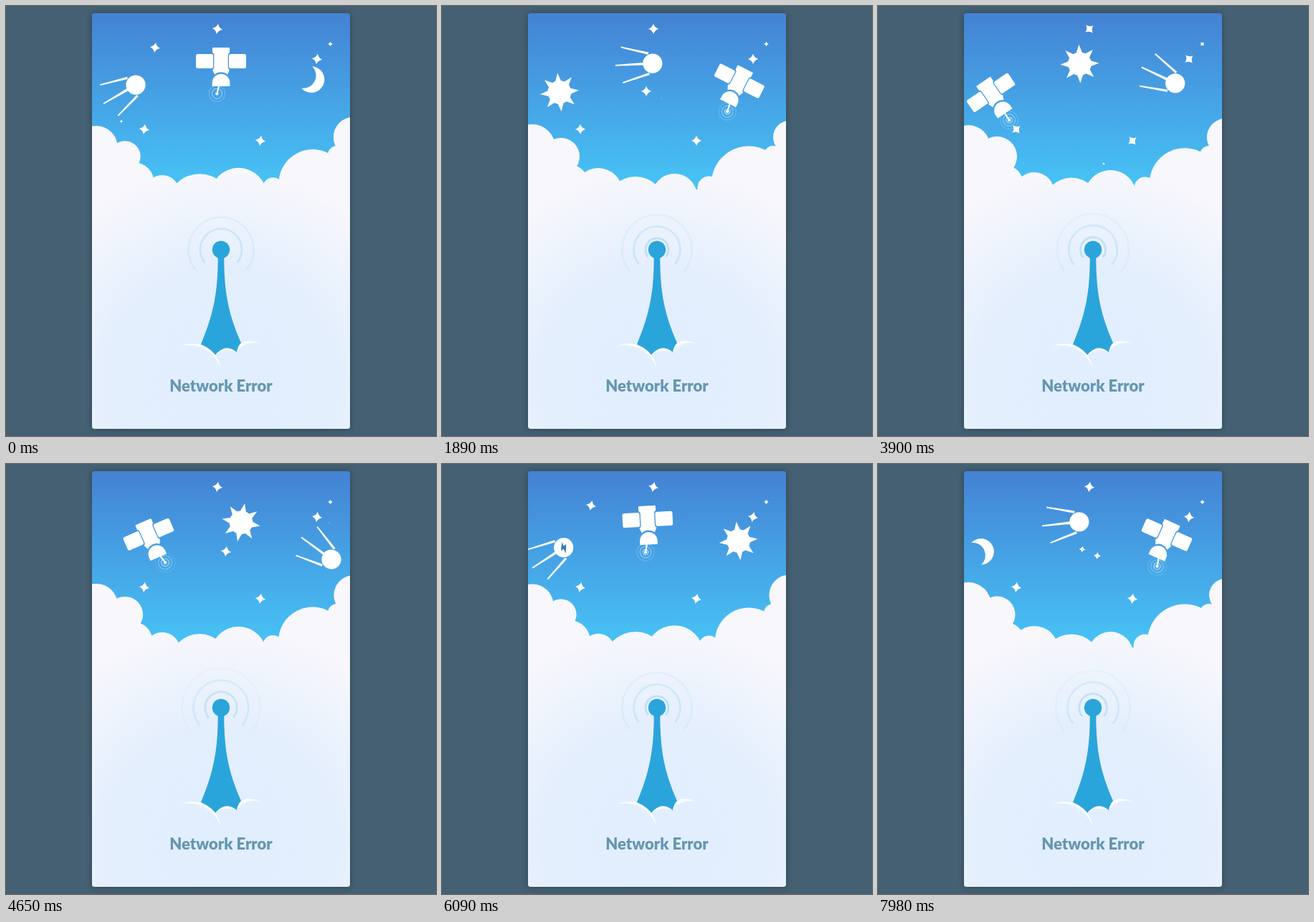
Write an HTML page that moves like this. It is 600x600 px and loops after 8000 ms.

```html
<!DOCTYPE html>
<html lang="en">
<head>
<meta charset="utf-8">
<title>Network Error</title>
<style>
html, body { margin: 0; width: 100%; height: 100%; overflow: hidden; background: #446072; }
svg { display: block; width: 600px; height: 600px; }
.card { filter: drop-shadow(0 0 4px rgba(0, 0, 0, .28)); }
.title { font: 900 22px Lato, "Open Sans", sans-serif; fill: #6596b1; text-anchor: middle; }
.wave { fill: none; }
</style>
</head>
<body>
<svg viewBox="0 0 600 600">
  <defs>
    <linearGradient id="sky" gradientUnits="userSpaceOnUse" x1="0" y1="10" x2="0" y2="250">
      <stop stop-color="#4482d4"/><stop offset="1" stop-color="#47c3f5"/>
    </linearGradient>
    <radialGradient id="mist" gradientUnits="userSpaceOnUse" cx="300" cy="525" r="295">
      <stop stop-color="#e0eefe"/><stop offset=".55" stop-color="#e4effd"/><stop offset="1" stop-color="#f7f7fc"/>
    </radialGradient>
    <clipPath id="frame"><rect x="120" y="10" width="360" height="580" rx="4"/></clipPath>
    <path id="star" d="M0-7.2Q1.7-1.7 7.2 0Q1.7 1.7 0 7.2Q-1.7 1.7-7.2 0Q-1.7-1.7 0-7.2Z"/>

    <g id="satellite">
      <rect x="265" y="67" width="24" height="20" rx="2.5"/>
      <rect x="311" y="67" width="24" height="20" rx="2.5"/>
      <path d="M289 58H311Q312 58 312 59V65Q309.7 66 309.7 69V85Q309.7 88 312 89L309 95.5A14 14 0 0 0 291 95.5L288 89Q290.3 88 290.3 85V69Q290.3 66 288 65V59Q288 58 289 58Z"/>
      <path d="M287.7 112V107A12.3 12.3 0 0 1 312.3 107V112Z"/>
      <g id="antenna">
        <path d="M299 106H301V123H299Z"/><circle cx="300" cy="123" r="2.2"/>
        <g id="pings" stroke="#fff"/>
      </g>
    </g>
    <g id="probe" transform="translate(306.9 80.1)">
      <circle r="13.6"/>
      <path d="M-42.8-25.8L-4.6-15.8L-5.8-12.7L-43.3-24Z"/>
      <path d="M-52.1-.8L-13-1.8V1.8L-52.1 1Z"/>
      <path d="M-42.8 25.8L-4.6 15.8L-5.8 12.7L-43.3 24Z"/>
      <path id="bolt" fill="#2d7cba" d="M2.3-8L-5.5 1.6H-1L-2 8.4L5.5-1.8H1Z"/>
    </g>
    <g id="moon" transform="translate(295.4 70)">
      <path id="crescent" d="M-7-16.9A18.3 18.3 0 1 1-7 16.9A17.8 17.8 0 0 0-7-16.9Z"/>
    </g>
    <g id="sun" transform="translate(300 80)"><g id="rays"><circle r="16.3"/></g></g>
  </defs>

  <g class="card"><rect x="120" y="10" width="360" height="580" rx="4" fill="#4482d4"/></g>
  <g clip-path="url(#frame)">
    <rect x="120" y="10" width="360" height="580" fill="url(#sky)"/>
    <g id="stars" fill="#fff">
      <use href="#star" x="295" y="32"/>
      <use href="#star" x="434" y="74"/>
      <use href="#star" x="193" y="172"/>
      <use href="#star" x="355" y="188"/>
      <use href="#star" transform="translate(452.5 53) scale(.46)"/>
    </g>
    <g id="orbit" fill="#fff"/>
    <g id="clouds" fill="url(#mist)">
      <path d="M120 195L150 200L178 235L218 256H372L430 225L480 190V590H120Z"/>
      <circle cx="126" cy="197" r="29.5" data-swell="2.5"/>
      <circle cx="166" cy="210" r="21.5" data-swell="7" class="late"/>
      <circle cx="178" cy="247" r="29" data-swell="-5" class="late"/>
      <circle cx="218" cy="260" r="23" data-swell="11"/>
      <circle cx="270" cy="278.6" r="44.6" data-swell="-6" class="late"/>
      <circle cx="324.5" cy="265.5" r="40.5" data-swell="-9"/>
      <circle cx="372.5" cy="253.5" r="14" data-swell="2"/>
      <circle cx="428" cy="247.5" r="47" data-swell="5"/>
      <circle cx="462" cy="208" r="13" data-swell="0"/>
      <circle cx="485" cy="183" r="28.7" data-swell="-5.7"/>
    </g>
    <g id="signal" stroke="#2aa5db" stroke-width="2.8"/>
    <g fill="#2aa5db">
      <circle cx="300" cy="340" r="12.2"/>
      <path d="M295.7 350C295.7 400 289.5 430 272 472L285 480L292 487Q300 477 310 478Q318 479 322 484Q323 475 328 470C310.5 430 304.3 400 304.3 350Z"/>
    </g>
    <g fill="#fafcff">
      <path d="M243 475Q262 467 278 475Q297 486 299 504Q291 486 276 478Q260 471 243 475Z"/>
      <path d="M292 487Q307 469 323 484Q307 476 292 487Z"/>
      <path d="M322 484Q326 459 355 471Q332 466 322 484Z"/>
    </g>
    <text class="title" x="300" y="538">Network Error</text>
  </g>
</svg>
<script>
const LOOP = 8000, PACE = 1050;   // one scene second lasts PACE ms
const CYCLE = 6;                  // scene seconds for clouds and sparkles
const $ = id => document.getElementById(id);
const mod = (a, n) => ((a % n) + n) % n;
const clamp = v => Math.min(1, Math.max(0, v));

function add(parent, tag, attrs) {
  const el = document.createElementNS("http://www.w3.org/2000/svg", tag);
  for (const key in attrs) el.setAttribute(key, attrs[key]);
  return $(parent).appendChild(el);
}
const turn = (el, angle, at = "0 0") => el.setAttribute("transform", `rotate(${angle} ${at})`);

for (let i = 0; i < 8; i++)
  add("rays", "path", { d: "M-4.2-15L0-27L4.2-15Z", transform: `rotate(${i * 45})` });

"moon satellite probe sun satellite probe moon".split(" ").forEach((id, i) =>
  add("orbit", "use", { href: "#" + id, transform: `rotate(${30 - 30 * i} 300 330)` }));

// Sparkles flash in pairs, one pair every quarter of the cycle.
const sparkles = [[306, 128], [285, 119], [312, 37], [315, 220], [307, 122], [451, 82], [208, 58], [161, 161]]
  .map(([x, y], i) => ({
    x, y,
    peak: 1.38 + CYCLE / 4 * (i >> 1) + .47 * (i % 2),
    el: add("stars", "use", { href: "#star" })
  }));

const puffs = [...$("clouds").querySelectorAll("circle")].map(el => ({
  el, radius: el.r.baseVal.value, swell: +el.dataset.swell, peak: el.matches(".late") ? 3.3 : 1.6
}));
const rings = [0, 1, 2].map(() => ({
  ping: add("pings", "circle", { class: "wave", cx: 300, cy: 123 }),
  wave: add("signal", "path", { class: "wave" })
}));

// Eased 0 to 1 to 0, with separate lengths for the rise and the fall.
function pulse(s, peak, rest = 5.6) {
  const p = mod(s - rest, CYCLE), rise = mod(peak - rest, CYCLE);
  const q = p < rise ? p / rise : (CYCLE - p) / (CYCLE - rise);
  return (1 - Math.cos(Math.PI * q)) / 2;
}

function arc(r) {
  const dx = r * .777, y = 340 + r * .629;
  return `M${300 - dx} ${y}A${r} ${r} 0 1 1 ${300 + dx} ${y}`;
}

function draw(s) {
  const swing = -Math.cos(2 * Math.PI * s / 3);
  turn($("orbit"), 15 * s, "300 330");
  turn($("antenna"), -13.5 * swing, "300 99");
  turn($("crescent"), 4 + 8 * swing);
  turn($("rays"), -60 * s);
  turn($("star"), 53 + 45 * swing);
  const blink = mod(s, 3);
  $("bolt").setAttribute("opacity", s > 1 && (blink > 2.6 || blink < .15) ? 1 : 0);

  for (const { x, y, peak, el } of sparkles) {
    const gap = Math.abs(mod(s - peak + CYCLE / 2, CYCLE) - CYCLE / 2);
    el.setAttribute("transform", `translate(${x} ${y}) scale(${clamp(1.35 * (1 - gap / .45))})`);
  }

  for (const { el, radius, swell, peak } of puffs)
    el.setAttribute("r", radius + swell * pulse(s, peak));

  // Rings shrink towards their transmitter and gain strength on the way.
  rings.forEach(({ ping, wave }, i) => {
    const step = i + mod(-s, 1), strength = 1 - step / 3;
    ping.setAttribute("r", 3 + 4.1 * step);
    ping.setAttribute("opacity", .75 * strength);
    wave.setAttribute("d", arc(12.8 + 16.3 * step));
    wave.setAttribute("opacity", .23 * strength);
  });
}

const start = performance.now();
function tick() {
  draw(((performance.now() - start) % LOOP) / PACE);
  requestAnimationFrame(tick);
}
draw(0);
requestAnimationFrame(tick);
</script>
</body>
</html>
```
